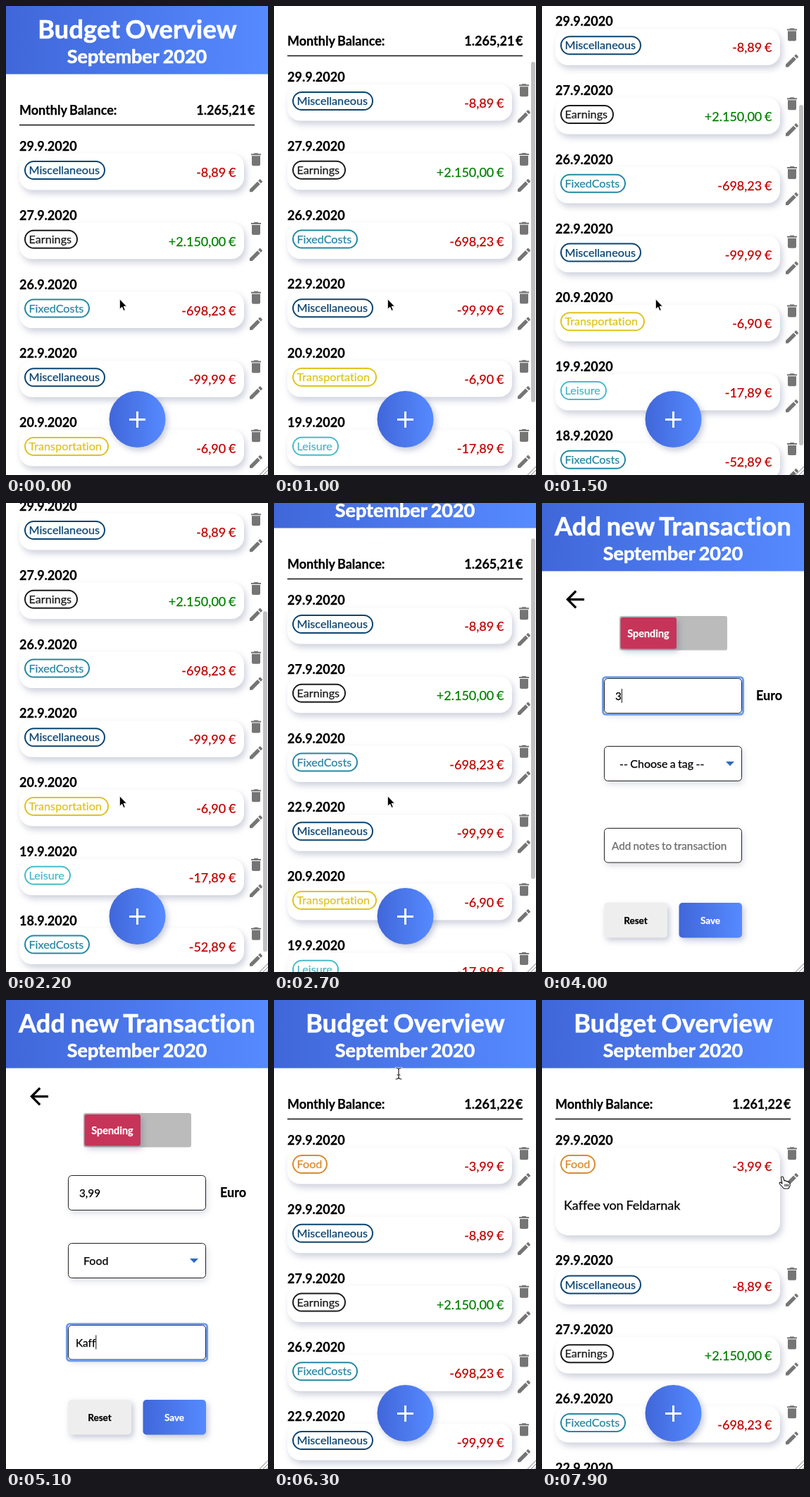
An HTML page for the animation above (8 s loop, 372 px wide and 664 px high).

```html
<!DOCTYPE html>
<html lang="en">
<head>
<meta charset="utf-8">
<title>Budget Overview</title>
<style>
html, body { margin: 0; width: 100%; height: 100%; overflow: hidden; background: #fff; }
svg { display: block; width: 372px; height: 664px; font: 18px Lato, sans-serif; }
text {
  white-space: pre; word-spacing: -.045em; font-variant-ligatures: none;
  fill: currentColor; stroke: currentColor; stroke-width: .25px;
}
.bold { font-weight: 700; }
.title { font-size: 36px; letter-spacing: .28px; }
.month { font-size: 27px; }
.head text, .white { color: #fff; }
.head text { stroke-width: .7px; }
.mid { text-anchor: middle; }
.end { text-anchor: end; }
.bold.end { word-spacing: -.15em; }
.tag { font-size: 16.2px; }
.pill { fill: none; stroke: currentColor; stroke-width: 2; }
.field { fill: #fff; stroke: #222; filter: drop-shadow(2px 4px 4px rgba(60, 70, 110, .18)); }
.input { font-size: 15.3px; }
.choice { font-size: 16px; }
.label { font-size: 13.5px; }
.ring { fill: none; stroke: #709ce9; stroke-width: 3; }
.card { fill: #fff; filter: drop-shadow(3px 5px 5px rgba(50, 60, 110, .24)); }
.raised { filter: drop-shadow(3px 4px 4px rgba(50, 60, 110, .28)); }
.icon { fill: #757575; }
.caret { fill: none; stroke: #111; }
</style>
</head>
<body>
<svg id="stage" viewBox="0 0 372 664">
  <defs>
    <linearGradient id="blue">
      <stop offset="0" stop-color="#4067d9"/>
      <stop offset="1" stop-color="#568aff"/>
    </linearGradient>
    <path id="trash" d="M6 19c0 1.1.9 2 2 2h8c1.1 0 2-.9 2-2V7H6v12zM19 4h-3.5l-1-1h-5l-1 1H5v2h14V4z"/>
    <path id="pencil" d="M3 17.25V21h3.75L17.81 9.94l-3.75-3.75L3 17.25zM20.71 7.04c.39-.39.39-1.02 0-1.41l-2.34-2.34c-.39-.39-1.02-.39-1.41 0l-1.83 1.83 3.75 3.75 1.83-1.83z"/>
  </defs>
  <rect width="372" height="664" fill="#fff"/>

  <g id="overview">
    <g id="page">
      <g class="head bold mid">
        <rect width="372" height="96.5" fill="url(#blue)"/>
        <text class="title" x="186.5" y="45.5">Budget Overview</text>
        <text class="month" x="186" y="80.5">September 2020</text>
      </g>
      <text class="bold" x="19" y="154">Monthly Balance:</text>
      <text id="balance" class="bold end" x="353.5" y="154"></text>
      <path d="M19 168.5H353" stroke="#111" stroke-width="1.6"/>
      <g id="rows"></g>
    </g>
    <rect id="thumb" x="365" width="6" height="482" rx="3" fill="#c1c1c1"/>
    <g class="raised">
      <circle cx="186.5" cy="585" r="40" fill="url(#blue)"/>
      <path d="M175 585.5H198M186.5 574V597" stroke="#fff" stroke-width="3"/>
    </g>
  </g>

  <g id="form">
    <g class="head bold mid">
      <rect width="372" height="96.5" fill="url(#blue)"/>
      <text class="title" x="186" y="45.5">Add new Transaction</text>
      <text class="month" x="186" y="80.5">September 2020</text>
    </g>
    <path transform="translate(27.6 117.1) scale(1.62)" d="M20 11H7.83l5.59-5.59L12 4l-8 8 8 8 1.41-1.41L7.83 13H20v-2z"/>
    <rect x="110" y="160" width="153" height="48.5" rx="3" fill="#bbb"/>
    <rect class="raised" x="111.5" y="162" width="79.5" height="44.5" rx="3" fill="#c73459"/>
    <text class="bold mid white" x="151" y="189.5" font-size="14.4">Spending</text>
    <rect class="field" x="88.5" y="248.5" width="195" height="49" rx="5"/>
    <rect id="sumRing" class="ring" x="86.5" y="246.7" width="199" height="52.6" rx="4"/>
    <text id="sum" class="input" x="104" y="279"></text>
    <text class="bold" x="304" y="279">Euro</text>
    <rect class="field" x="88.5" y="344.5" width="195" height="49" rx="5"/>
    <text id="choice" class="choice" x="110" y="374.5"></text>
    <path d="M261 366H273L267 372.2Z" fill="#2a6cc2"/>
    <rect class="field" x="88.5" y="460.5" width="195" height="48.5" rx="5"/>
    <rect id="noteRing" class="ring" x="86.5" y="458.7" width="199" height="52" rx="4"/>
    <text id="note" class="input" x="99" y="490.5"></text>
    <path id="caret" class="caret"/>
    <rect class="raised" x="88" y="566" width="90" height="49.5" rx="5" fill="#eee"/>
    <text class="bold mid label" x="133" y="596">Reset</text>
    <rect class="raised" x="194.5" y="566" width="89.5" height="49.5" rx="5" fill="url(#blue)"/>
    <text class="bold mid label white" x="239" y="596">Save</text>
  </g>

  <path d="M360 664L372 652M365 664L372 657M370 664L372 662" stroke="#777" stroke-width=".9"/>

  <g id="pointer">
    <path id="arrow" d="M0 0V14.5L3.4 11.4L5.7 16.7L8 15.7L5.8 10.5H10.2Z" stroke="#fff" stroke-width=".9"/>
    <g id="beam" fill="none" stroke-linecap="round">
      <path d="M-4-8Q0-8 0-5V5Q0 8-4 8M4-8Q0-8 0-5M0 5Q0 8 4 8M-2 2H2" stroke="#fff" stroke-width="2.6"/>
      <path d="M-4-8Q0-8 0-5V5Q0 8-4 8M4-8Q0-8 0-5M0 5Q0 8 4 8M-2 2H2" stroke="#222" stroke-width="1.2"/>
    </g>
    <path id="hand" d="M-1.5 1Q0-1 1.5 1L3 6Q5 5 6 7Q8 6 8.5 8Q11 7.5 11 10V13L9 17H2.5L-3 11Q-5 8-2.5 8L0 10Z M4 10.5V14M6.2 10.5V14M8.4 10.5V14"
      fill="#fff" stroke="#111" stroke-width="1.1" stroke-linejoin="round"/>
  </g>
</svg>
<script>
const LOOP = 8000, STEP = 100, PITCH = 97.75, GROWTH = 72.7;
const FORM_IN = 3500, FORM_OUT = 5800;
const NOTE = 'Kaffee von Feldarnak';

// name: [colour, pill width]
const TAGS = {
  Miscellaneous: ['#0b4470', 115],
  Earnings: ['#1c1c1c', 76],
  FixedCosts: ['#2587a3', 93],
  Transportation: ['#dfc41d', 120],
  Leisure: ['#4bbac8', 66],
  Food: ['#dc8a2e', 50]
};
const ENTRIES = [
  ['29.9.2020', 'Food', '-3,99 €'],
  ['29.9.2020', 'Miscellaneous', '-8,89 €'],
  ['27.9.2020', 'Earnings', '+2.150,00 €'],
  ['26.9.2020', 'FixedCosts', '-698,23 €'],
  ['22.9.2020', 'Miscellaneous', '-99,99 €'],
  ['20.9.2020', 'Transportation', '-6,90 €'],
  ['19.9.2020', 'Leisure', '-17,89 €'],
  ['18.9.2020', 'FixedCosts', '-52,89 €']
];

// [time, values...], linear in between
const SCROLL = [[0, 0], [1000, 98], [1800, 224], [1900, 225], [2200, 194], [2700, 61], [3000, 0]];
const GROW = [[6700, 0], [6800, .2], [7000, .8], [7200, 1]];
const PATH = [
  [3000, 161.3, 414.8], [3300, 187, 588], [3500, 187, 588], [3800, 150, 273],
  [4500, 150, 273], [4700, 190, 369], [4900, 190, 369], [5000, 180, 485],
  [5500, 180, 485], [5700, 239, 590], [5800, 239, 590], [6200, 177, 104],
  [6300, 177, 104], [6600, 190, 236], [7300, 190, 236], [7800, 341, 250]
];
// [time, value], held until the next
const SHAPE = [
  [0, 'arrow'], [3300, 'hand'], [3600, 'arrow'], [3700, 'beam'], [3900, ''],
  [4500, 'beam'], [4600, 'arrow'], [5000, 'beam'], [5100, ''], [5500, 'arrow'],
  [5700, 'hand'], [5900, 'arrow'], [6100, 'beam'], [6500, 'hand']
];
const SUM = [[0, ''], [4000, '3'], [4100, '3,'], [4300, '3,9'], [4400, '3,99']];
const FOCUS = [[0, ''], [3800, 'sum'], [4700, ''], [5000, 'note']];

const $ = id => document.getElementById(id);
const show = (el, on) => el.style.display = on ? '' : 'none';
const move = (el, x, y) => el.setAttribute('transform', `translate(${x} ${y})`);

function held(table, t) {
  return table.reduce((v, [at, value]) => t >= at ? value : v, '');
}

function tween(table, t) {
  const i = table.findIndex(k => k[0] > t);
  if (i < 0) return table[table.length - 1].slice(1);
  if (i === 0) return table[0].slice(1);
  const a = table[i - 1], b = table[i], p = (t - a[0]) / (b[0] - a[0]);
  return a.slice(1).map((v, k) => v + (b[k + 1] - v) * p);
}

function rowMarkup([date, tag, amount], i) {
  const [colour, width] = TAGS[tag];
  return `<g>
    <rect class="card" x="19" y="209" width="319" height="51.5" rx="18"/>
    <text class="bold" x="19" y="205">${date}</text>
    <g color="${colour}">
      <rect class="pill" x="27" y="220" width="${width - 2}" height="25" rx="12.5"/>
      <text class="tag" x="32.5" y="238.2">${tag}</text>
    </g>
    <text class="end" x="326.5" y="242" color="${amount[0] === '+' ? '#008000' : '#c00000'}">${amount}</text>
    <use class="icon" href="#trash" x="343" y="205.3"/>
    <use class="icon" href="#pencil" x="343" y="242.3"/>
    ${i ? '' : `<text id="memo" x="31" y="297">${NOTE}</text>`}
  </g>`;
}

$('rows').innerHTML = ENTRIES.map(rowMarkup).join('');
const rows = [...$('rows').children];
const firstCard = rows[0].querySelector('.card');

function drawOverview(t) {
  const saved = t >= FORM_OUT;
  const [y] = tween(SCROLL, t), [grow] = tween(GROW, t);
  move($('page'), 0, -y);
  $('balance').textContent = saved ? '1.261,22 €' : '1.265,21 €';
  rows.forEach((row, i) => {
    const slot = saved ? i : i - 1;
    move(row, 0, slot * PITCH + (i ? grow * GROWTH : 0));
  });
  show(rows[0], saved);
  firstCard.setAttribute('height', 51.5 + grow * GROWTH);
  $('memo').style.opacity = Math.max(0, grow * 2 - 1);
  $('thumb').setAttribute('y', 3 + y * .775);
  $('thumb').style.opacity = t < 100 ? 0 : Math.min(1, Math.max(0, (3300 - t) / 200));
}

function drawForm(t) {
  const typed = NOTE.slice(0, Math.max(0, Math.ceil((t - 5000) / 500 * NOTE.length)));
  const focus = held(FOCUS, t);
  $('sum').textContent = held(SUM, t);
  $('choice').textContent = t < 4900 ? '-- Choose a tag --' : 'Food';
  $('note').textContent = typed || 'Add notes to transaction';
  $('note').setAttribute('color', typed ? '#000' : '#6c6c6c');
  show($('sumRing'), focus === 'sum');
  show($('noteRing'), focus === 'note');
  show($('caret'), focus);
  if (focus) {
    const field = $(focus);
    const empty = focus === 'note' ? !typed : !field.textContent;
    const x = +field.getAttribute('x') + (empty ? 0 : field.getComputedTextLength()) + .5;
    $('caret').setAttribute('d', `M${x} ${+field.getAttribute('y') - 16}v20`);
  }
}

function draw(t) {
  const adding = t >= FORM_IN && t < FORM_OUT;
  show($('overview'), !adding);
  show($('form'), adding);
  if (adding) drawForm(t); else drawOverview(t);
  move($('pointer'), ...tween(PATH, t));
  const shape = held(SHAPE, t);
  for (const id of ['arrow', 'beam', 'hand']) show($(id), id === shape);
}

const start = performance.now();
function tick() {
  const t = (performance.now() - start) % LOOP;
  draw(Math.floor(t / STEP) * STEP);
  requestAnimationFrame(tick);
}
tick();
</script>
</body>
</html>
```
